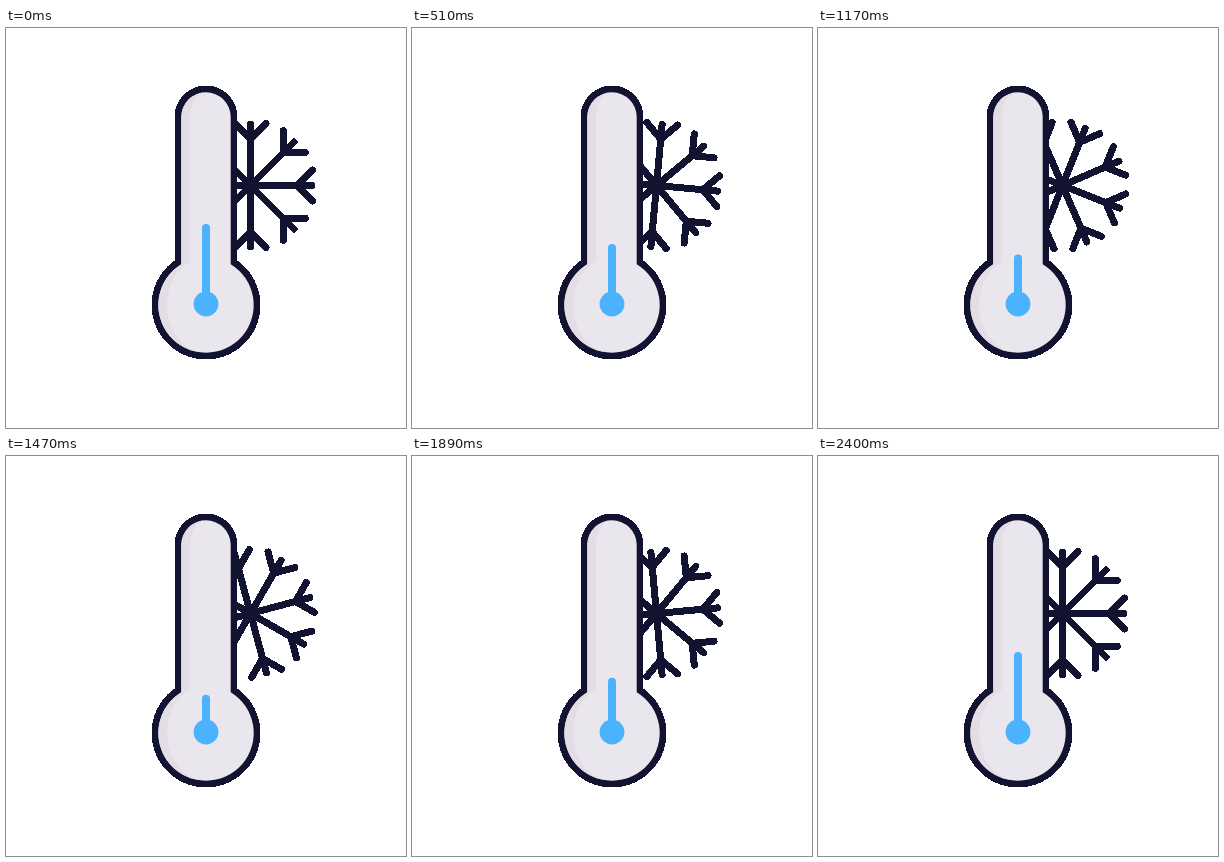
Animation of 400 by 400 pixels, one loop 2430 ms. Source, as an HTML page:

```html
<!DOCTYPE html>
<html>
<head>
<meta charset="utf-8">
<style>
  html, body { margin: 0; height: 100%; overflow: hidden; background: #fff; }
  svg { display: block; width: 100%; height: 100%; }
</style>
</head>
<body>
<svg viewBox="0 0 400 400" fill="none" stroke-linecap="round" stroke-linejoin="round">
  <defs>
    <path id="arm" d="M0 0H61.5M62 -15.5L46.5 0L62 15.5"/>
  </defs>
  <g stroke="#121331" stroke-width="7" shape-rendering="crispEdges">
    <g id="flake"></g>
    <path d="M172 234.4V89a28 28 0 0 1 56 0V234.4A51 51 0 1 1 172 234.4Z" stroke-width="6.9" fill="#121331"/>
  </g>
  <path d="M175.3 236.2V89a24.7 24.7 0 0 1 49.4 0V236.2A47.7 47.7 0 1 1 175.3 236.2Z" fill="#eae6ed"/>
  <path d="M200 64.3A24.7 24.7 0 0 0 175.3 89V236.2A47.7 47.7 0 0 0 200 324.7A39 47.7 0 0 1 184 233.5V89A16 24.7 0 0 1 200 64.3Z" fill="#e4dde5"/>
  <path id="mercury" stroke="#4bb3fd" stroke-width="8"/>
  <circle cx="200" cy="276" r="12.4" fill="#4bb3fd"/>
</svg>
<script>
  const LOOP = 2430, STEP = 30;
  // [time in steps, height of the mercury's end]
  const levels = [[0, 200], [15, 221], [25, 212.5], [50, 243], [80, 200]];
  const flake = document.getElementById('flake');
  const mercury = document.getElementById('mercury');

  for (let i = 0; i < 8; i++) {
    flake.innerHTML += `<use href="#arm" transform="rotate(${i * 45})"/>`;
  }

  const ease = t => t * t * (3 - 2 * t);

  function levelAt(time) {
    const i = Math.max(1, levels.findIndex(([end]) => time <= end));
    const [t0, y0] = levels[i - 1], [t1, y1] = levels[i];
    return y0 + (y1 - y0) * ease((time - t0) / (t1 - t0));
  }

  function draw(now) {
    const time = Math.floor(now % LOOP / STEP);
    flake.setAttribute('transform', `translate(244.5 157.5) rotate(${45 * ease(time / 80)})`);
    mercury.setAttribute('d', `M200 276V${levelAt(time)}`);
  }

  const start = performance.now();
  function tick() {
    draw(performance.now() - start);
    requestAnimationFrame(tick);
  }
  tick();
</script>
</body>
</html>
```
